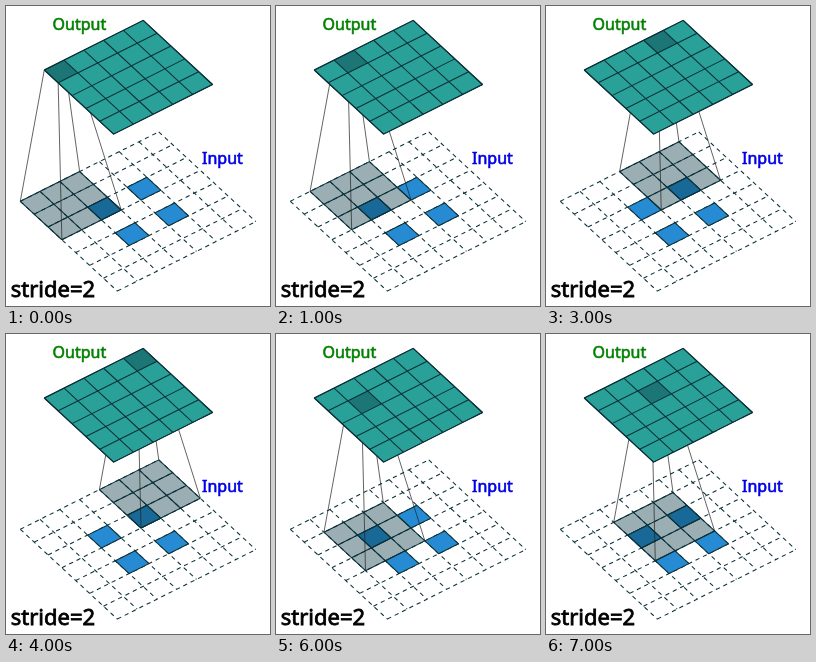
Animation, 264 px wide and 300 px high, one loop 8 s. Source, as an HTML page:

```html
<!DOCTYPE html>
<html lang="en">
<head>
<meta charset="utf-8">
<title>Transposed convolution, stride 2</title>
<style>
  html, body { margin: 0; width: 100%; height: 100%; overflow: hidden; background: #fff; }
  svg { display: block; width: 264px; height: 300px; }
  text { font: 400 16px "Noto Sans", "Open Sans", sans-serif; stroke-width: .6; }
  path { stroke: #0a3038; stroke-width: 1.05; fill: none; stroke-linejoin: round; }
  #dashes { stroke-dasharray: 4.3 3.9; }
  #cells { fill: #268bd2; }
  #output { fill: #2aa198; }
  .shade { fill: #073642; fill-opacity: .4; stroke: none; }
  #rays { stroke: #222; stroke-width: .7; }
  .green { fill: #008000; stroke: #008000; }
  .blue { fill: #0000e6; stroke: #0000e6; }
  .big { font-size: 22px; stroke: #000; stroke-width: .8; }
</style>
</head>
<body>
<svg viewBox="0 0 264 300">
  <path id="dashes"/>
  <path id="cells"/>
  <path id="kernel" class="shade"/>
  <path id="kernelGrid"/>
  <path id="rays"/>
  <path id="output"/>
  <path id="cell" class="shade"/>
  <path id="outputGrid"/>
  <text class="green" x="46.6" y="24.4">Output</text>
  <text class="blue" x="196" y="158.4">Input</text>
  <text class="big" x="4.8" y="290.5">stride=2</text>
</svg>
<script>
const STEP = 1000, STEPS = 8, OUT = 5, IN = 7, K = 3;

// Maps (row, column) on a tilted plane to stage coordinates.
const plane = (x, y) => (r, c) => [x + 19.78 * c + 13.86 * r, y - 9.92 * c + 12.82 * r];
const input = plane(14.3, 195.3);
const output = plane(38.3, 64);

const set = (id, d) => document.getElementById(id).setAttribute("d", d);
const seg = (a, b) => `M${a}L${b}`;
const corners = (p, r, c, n) => [p(r, c), p(r, c + n), p(r + n, c + n), p(r + n, c)];
const quad = (p, r, c, n) => "M" + corners(p, r, c, n).join("L") + "Z";

function grid(p, r, c, n) {
  let d = "";
  for (let i = 0; i <= n; i++) {
    d += seg(p(r + i, c), p(r + i, c + n)) + seg(p(r, c + i), p(r + n, c + i));
  }
  return d;
}

set("dashes", grid(input, 0, 0, IN));
set("cells", [2, 4].map(r => [2, 4].map(c => quad(input, r, c, 1)).join("")).join(""));
set("output", quad(output, 0, 0, OUT));
set("outputGrid", grid(output, 0, 0, OUT));

function draw(ms) {
  const i = Math.floor(ms / STEP) % STEPS;
  const r = Math.floor(i / OUT), c = i % OUT;
  const from = corners(output, r, c, 1), to = corners(input, r, c, K);
  set("kernel", quad(input, r, c, K));
  set("kernelGrid", grid(input, r, c, K));
  set("cell", quad(output, r, c, 1));
  set("rays", from.map((p, k) => seg(p, to[k])).join(""));
}

const start = performance.now();
function tick() {
  draw(performance.now() - start);
  requestAnimationFrame(tick);
}
tick();
</script>
</body>
</html>
```
